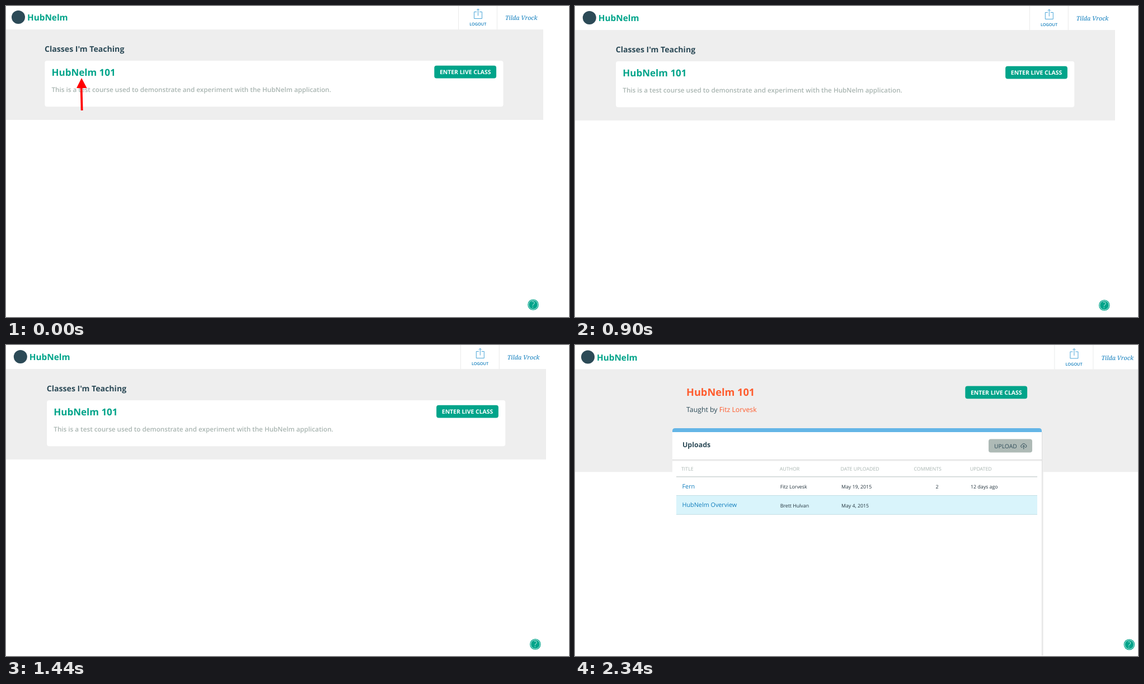
Animation of 1006 by 557 pixels, one loop 2.7 s. Source, as an HTML page:

```html
<!DOCTYPE html>
<html lang="en">
<head>
<meta charset="utf-8">
<title>Class walkthrough</title>
<style>
  html, body { margin: 0; width: 100%; height: 100%; overflow: hidden; background: #fff; }
  svg { display: block; width: 1006px; height: 557px; }
  text { font-family: "Open Sans", "Noto Sans", sans-serif; text-rendering: geometricPrecision; white-space: pre; }
  .serif { font-family: "Noto Serif", serif; font-style: italic; }
</style>
</head>
<body>
<svg id="stage" viewBox="0 0 1006 557" xmlns="http://www.w3.org/2000/svg"></svg>
<script>
const GREEN = '#00a48a', DARK = '#2c4a57', BLUE = '#0f7dbd', ICON = '#4aa5d8',
      ORANGE = '#ff5c2e', GREY = '#a9b5b1', BAND = '#eeeeee', INK = '#22323c';
const BRAND = 'HubNelm', TEACHER = 'Fitz Lorvesk';
const STEP = 900;

const text = (x, y, size, fill, str, weight = 400, extra = '') =>
  `<text x="${x}" y="${y}" font-size="${size}" font-weight="${weight}" fill="${fill}" ${extra}>${str}</text>`;
const rect = (x, y, w, h, fill, r = 0) =>
  `<rect x="${x}" y="${y}" width="${w}" height="${h}" fill="${fill}" rx="${r}"/>`;
const path = (d, stroke, width = 1) =>
  `<path d="${d}" fill="none" stroke="${stroke}" stroke-width="${width}"/>`;
const shift = (x, y, body) => `<g transform="translate(${x} ${y})">${body}</g>`;

const logo = () =>
  `<circle cx="22" cy="20" r="12" fill="${DARK}"/>` + text(38, 26, 15.3, GREEN, BRAND, 700);

// Logout link, user name and help badge, which keep to the right edge.
const rightSide = () =>
  path('M808.5 -2V42M877.5 -2V42', '#e9eaea') +
  path('M841 10.5H836.5V22.5H850.5V10.5H846M843.5 17.5V5M841 7.5L843.5 5L846 7.5', ICON) +
  text(843.2, 35, 7.3, BLUE, 'LOGOUT', 600, 'text-anchor="middle"') +
  text(892, 25, 10.7, BLUE, 'Tilda Vrock', 400, 'class="serif"') +
  `<circle cx="942" cy="535" r="9.8" fill="${GREEN}"/>` +
  `<circle cx="942" cy="535" r="8.2" fill="none" stroke="#fff" stroke-width=".8"/>` +
  text(942, 540.3, 15, '#fff', '?', 300, 'text-anchor="middle"');

const liveButton = (x, y) =>
  rect(x, y, 110.8, 22.8, GREEN, 4) +
  text(x + 55.4, y + 15, 10.4, '#fff', 'ENTER LIVE CLASS', 700, 'text-anchor="middle"');

const classList = () =>
  text(69, 82, 14.1, DARK, "Classes I'm Teaching", 700) +
  rect(69.3, 98, 819.2, 82.3, '#fff', 4) +
  text(81.5, 125, 17, GREEN, BRAND + ' 101', 700) +
  liveButton(765.3, 106.8) +
  text(81.5, 153.5, 11.7, GREY,
    `This is a test course used to demonstrate and experiment with the ${BRAND} application.`, 600);

const arrow = () =>
  path('M134.6 145L135.6 187', '#f00', 3.8) + '<path d="M135 129L144.5 147H126Z" fill="#f00"/>';

const listScene = (dx, dy, bandWidth) =>
  rect(0, 42 + dy, bandWidth, 162, BAND) +
  shift(dx, dy, logo() + rightSide() + classList());

const COLUMNS = [[190, 'TITLE'], [365.7, 'AUTHOR'], [474.5, 'DATE UPLOADED'],
                 [605.5, 'COMMENTS'], [705.7, 'UPDATED']];

const row = (y, title, author, date, count, updated) =>
  text(191.5, y, 10.8, BLUE, title, 500) +
  [[366.7, author], [476, date], [644.5, count], [707, updated]]
    .map(([x, s]) => text(x, y + .5, 8.8, INK, s, 500)).join('');

const cloud = () =>
  path('M799.5 183.5H798.6A2.3 2.3 0 0 1 798.4 179A3.6 3.6 0 0 1 805 178.7A2.5 2.5 0 0 1 805.2 183.5H804.2' +
       'M801.8 186.5V179.8M799.8 181.8L801.8 179.8L803.8 181.8', DARK);

const courseScene = () =>
  rect(0, 43.5, 1006, 183.5, BAND) +
  rect(0, 227, 1006, 1, '#f8f8f8') +
  shift(1, 1.5, logo()) + shift(48.4, 1.5, rightSide()) +
  text(199, 91, 18.2, ORANGE, BRAND + ' 101', 700) +
  text(199, 119.5, 12.3, DARK, `Taught by <tspan fill="${ORANGE}">${TEACHER}</tspan>`, 500) +
  liveButton(697.3, 73.5) +
  rect(834, 156, 1.5, 400, '#dedede') + rect(835.5, 156, 1.5, 400, '#efefef') +
  rect(174, 153, 660, 404, '#fff') +
  '<path d="M174 156V154Q174 149 179 149H829Q834 149 834 154V156Z" fill="#64b5e6"/>' +
  rect(174, 205, 660, 1.5, '#dcdcdc') + rect(174, 206.5, 660, 1.5, '#f0f0f0') +
  text(192, 183, 12.4, DARK, 'Uploads', 700) +
  rect(739, 168.5, 78, 24, '#aebab6', 4) +
  text(749, 184.5, 10.3, DARK, 'UPLOAD', 500) + cloud() +
  COLUMNS.map(([x, s]) => text(x, 225, 8.8, GREY, s, 500)).join('') +
  rect(181, 235, 645, 2, '#d9dede') +
  rect(181, 269, 645, 35, '#d9f4fb') +
  rect(181, 269, 645, 1, '#c3dfe5') + rect(181, 303, 645, 1, '#c3dfe5') +
  row(256.5, 'Fern', TEACHER, 'May 19, 2015', '2', '12 days ago') +
  row(290.3, BRAND + ' Overview', 'Brett Hulvan', 'May 4, 2015', '', '');

const scenes = [listScene(0, 0, 960) + arrow(), listScene(3.8, 1, 965), courseScene()];
const stage = document.getElementById('stage');
stage.innerHTML = scenes.map(s => `<g visibility="hidden">${s}</g>`).join('');
const groups = [...stage.children];

const start = performance.now();
let shown = -1;
function draw() {
  const now = Math.floor((performance.now() - start) / STEP) % scenes.length;
  if (now !== shown) {
    groups.forEach((g, i) => g.setAttribute('visibility', i === now ? 'visible' : 'hidden'));
    shown = now;
  }
  requestAnimationFrame(draw);
}
draw();
</script>
</body>
</html>
```
